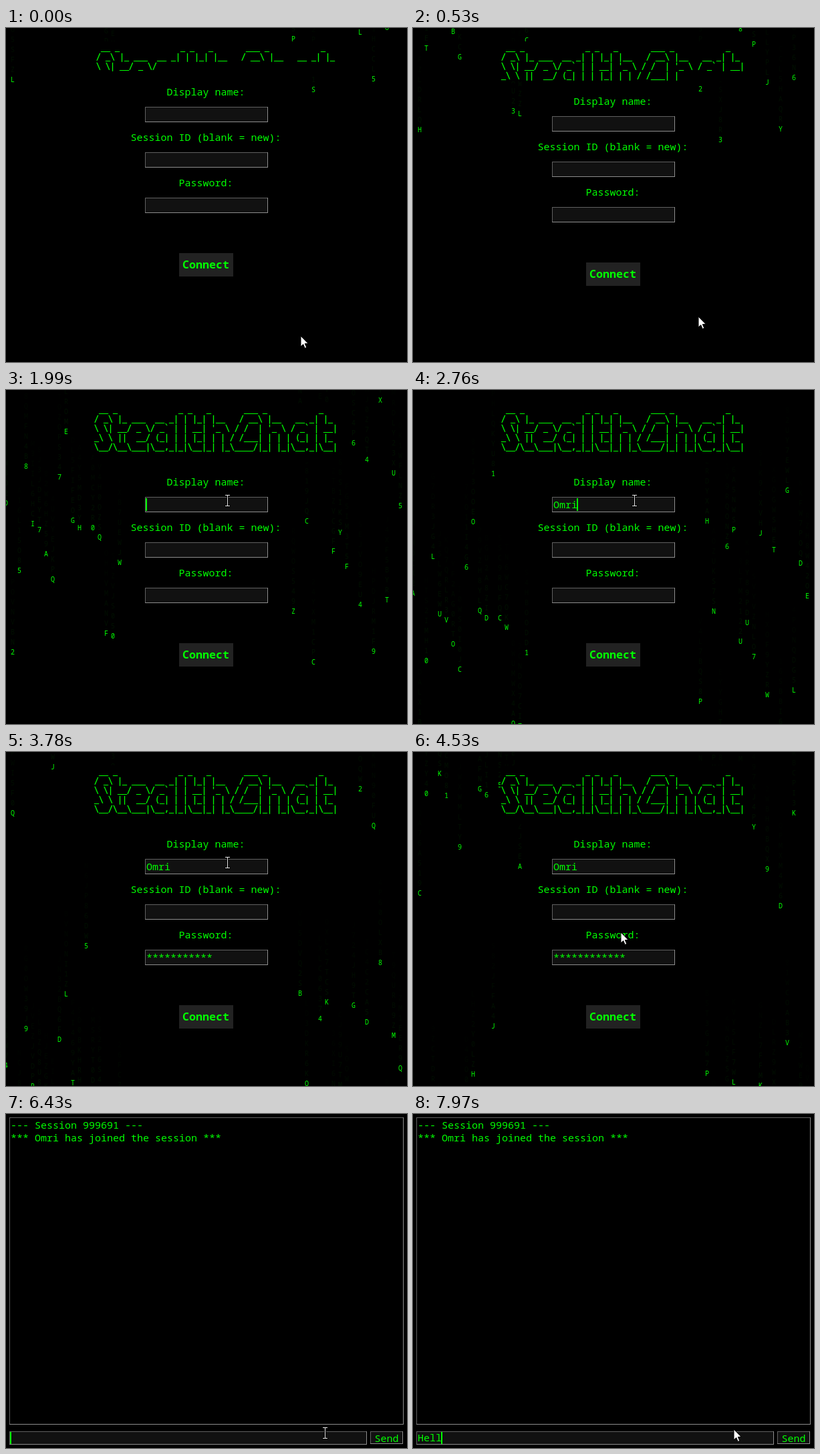
These frames come from a looping animation (600x500 px, 8000 ms). An HTML page with a canvas:

```html
<!DOCTYPE html>
<html lang="en">
<head>
<meta charset="utf-8">
<title>Chat login</title>
<style>
html, body { margin: 0; width: 600px; height: 500px; overflow: hidden; background: #000; }
canvas { display: block; }
</style>
</head>
<body>
<canvas id="stage" width="600" height="500"></canvas>
<script>
const ctx = document.getElementById('stage').getContext('2d');
const LOOP = 8000;
const PRESS = 5130;   // Connect goes down and the login window stalls
const JOIN = 5890;    // chat window opens
const GREEN = '#00ff00';
const MONO = '"Noto Sans Mono", "DejaVu Sans Mono", monospace';
const FONT = '15px ' + MONO;
const CHAR = 9;
const USER = 'Omri';

// "~" stands for a backtick
const BANNER = String.raw`
 __ _             _ _   _       ___ _           _
/ _\ |_ ___  __ _| | |_| |__   / __\ |__   __ _| |_
\ \| __/ _ \/ _~ | | __| '_ \ / /  | '_ \ / _~ | __|
_\ \ ||  __/ (_| | | |_| | | / /___| | | | (_| | |_
\__/\__\___|\__,_|_|\__|_| |_\____/|_| |_|\__,_|\__|
`.slice(1).replace(/~/g, '`');
const BANNER_START = BANNER.indexOf('\\ \\|') + 13;
const LINE = 14;

const GLYPHS = 'ABCDEFGHIJKLMNOPQRSTUVWXYZ0123456789';
const DROP = 15;
const RAIN_TICK = 91.6;

const MOVES = [
  { at: 380, ms: 780, x: 299, y: 166 },
  { at: 1300, ms: 400, x: 331, y: 165 },
  { at: 4150, ms: 800, x: 288, y: 392 },
  { at: 5600, ms: 140, x: 227, y: 430 },
  { at: JOIN, ms: 510, x: 477, y: 477 },
  { at: 6740, ms: 1, x: 480, y: 472 }
];

const clamp = (v, lo, hi) => Math.max(lo, Math.min(hi, v));
const blink = (t, focus) => t >= focus && (t - focus) % 900 < 600;
const typed = (str, t, start, gap) =>
  str.slice(0, clamp(Math.floor((t - start) / gap) + 1, 0, str.length));

function random(a, b) {
  const r = Math.sin(a * 127.1 + b * 311.7) * 43758.5453;
  return r - Math.floor(r);
}

function rect(x, y, w, h, fill) {
  ctx.fillStyle = fill;
  ctx.fillRect(x, y, w, h);
}

function text(str, x, y, font = FONT, color = GREEN) {
  ctx.font = font;
  ctx.fillStyle = color;
  ctx.fillText(str, x, y);
}

// Sunken box with a one pixel bevel
function box(x, y, w, h, fill) {
  rect(x, y, w, h, '#8c8c8c');
  rect(x, y, w - 1, h - 1, '#606060');
  rect(x + 1, y + 1, w - 2, h - 2, fill);
}

function stream(col, y, step) {
  for (let k = 8; k >= 0; k--) {
    const glyph = GLYPHS[Math.floor(random(col, step - k) * GLYPHS.length)];
    const color = k ? `rgb(0,${20 - k * 2},0)` : GREEN;
    text(glyph, col * 10, y - k * DROP + 3, '10px ' + MONO, color);
  }
}

// Columns fall on both sides of the form and start again after a random pause
function rain(t) {
  const step = Math.floor(t / RAIN_TICK);
  ctx.textAlign = 'center';
  for (let col = 0; col < 60; col++) {
    if (col > 17 && col < 43) continue;
    const first = Math.round(random(col, 0.5) * 425 - 330);
    const gap = Math.round(560 + 200 * random(col, 1.5) ** 1.5);
    for (let y = first + step * DROP; y > -10; y -= gap) stream(col, y, step);
  }
  ctx.textAlign = 'left';
}

// Types the banner and returns how far the form below is pushed
function banner(t) {
  const rows = BANNER.slice(0, BANNER_START + Math.floor(t * 0.15)).split('\n');
  const width = Math.max(...rows.map(row => row.length)) * 7;
  const x = Math.round(313.5 - width / 2);
  rect(131, 20, 367, 4 + rows.length * LINE, '#000');
  ctx.strokeStyle = GREEN;
  ctx.lineWidth = 0.35;
  rows.forEach((row, i) => {
    const y = 33 + i * LINE;
    text(row, x, y, '11.63px "DejaVu Sans Mono", monospace');
    ctx.strokeText(row, x, y);
  });
  return (rows.length - 6) * LINE;
}

function field(label, y, value, caret) {
  text(label, 299 - label.length * CHAR / 2, y - 17);
  box(208, y, 184, 23, '#111');
  text(value, 210, y + 17);
  if (caret) rect(209 + value.length * CHAR, y + 2, 2, 19, GREEN);
}

function login(t) {
  rain(t);
  ctx.save();
  ctx.translate(0, banner(t));
  field('Display name:', 160, typed(USER, t, 2210, 160), t < 2910 && blink(t, 1770));
  field('Session ID (blank = new):', 228, '', t >= 2910 && t < 3000);
  field('Password:', 296, typed('*'.repeat(12), t, 3030, 74), blink(t, 3000));
  const down = t >= PRESS ? 1 : 0;
  rect(259, 379, 81, 35, down ? '#333' : '#222');
  text('Connect', 264 + down, 402 + down, 'bold 16.67px ' + MONO, down ? '#000' : GREEN);
  ctx.restore();
}

function chat(t) {
  box(5, 5, 590, 460, '#000');
  text('--- Session 999691 ---', 7, 22);
  text(`*** ${USER} has joined the session ***`, 7, 41);
  box(5, 475, 535, 20, '#111');
  const message = typed('Hell', t, 7420, 180);
  text(message, 7, 490);
  if (blink(t, 5240)) rect(6 + message.length * CHAR, 476, 2, 18, GREEN);
  box(545, 475, 49, 19, '#111');
  text('Send', 551.5, 491);
}

function beam(x, y) {
  for (const [grow, color] of [[1, '#000'], [0, '#e8e8e8']]) {
    const bar = (bx, by, w, h) =>
      rect(bx - grow, by - grow, w + 2 * grow, h + 2 * grow, color);
    bar(x, y - 8, 1, 17);
    bar(x - 3, y - 8, 7, 1);
    bar(x - 3, y + 8, 7, 1);
  }
}

function arrow(x, y) {
  const shape = new Path2D('M0 0V16L3.7 12.6 6.2 18.4 8.8 17.3 6.3 11.6 11 11.3Z');
  ctx.save();
  ctx.translate(x, y);
  ctx.lineWidth = 1;
  ctx.strokeStyle = '#000';
  ctx.fillStyle = '#fff';
  ctx.fill(shape);
  ctx.stroke(shape);
  ctx.restore();
}

function cursor(t) {
  let x = 441, y = 461;
  for (const move of MOVES) {
    const u = clamp((t - move.at) / move.ms, 0, 1);
    const ease = u * u * (3 - 2 * u);
    x += (move.x - x) * ease;
    y += (move.y - y) * ease;
  }
  x = Math.round(x);
  y = Math.round(y);
  const inField = x > 208 && x < 392 && [160, 228, 296].some(top => y >= top && y <= top + 23);
  const overText = t < JOIN ? inField : t < 6740;
  (overText ? beam : arrow)(x, y);
}

function draw(now) {
  const t = now % LOOP;
  rect(0, 0, 600, 500, '#000');
  if (t < JOIN) login(Math.min(t, PRESS));
  else chat(t);
  cursor(t);
}

const start = performance.now();
function loop() {
  draw(performance.now() - start);
  requestAnimationFrame(loop);
}
loop();
</script>
</body>
</html>
```
